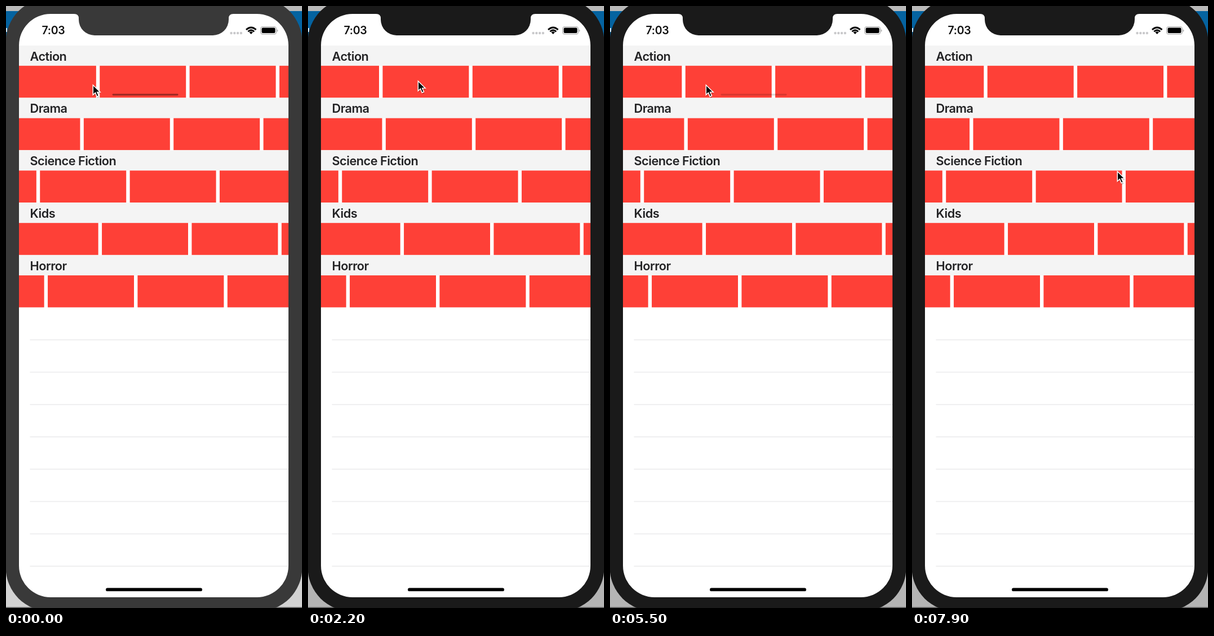
These frames come from a looping animation (525 px wide and 1066 px high, 8000 ms). An HTML page:

```html
<!DOCTYPE html>
<html lang="en">
<head>
<meta charset="utf-8">
<title>Scrolling rows</title>
<style>
  html, body { margin: 0; width: 100%; height: 100%; overflow: hidden; background: #b4b4b4; }
  svg { display: block; width: 525px; height: 1066px; }
  text { font-family: Inter, "Liberation Sans", sans-serif; font-weight: 600; fill: #222224; }
</style>
</head>
<body>
<svg viewBox="0 0 525 1066" xmlns="http://www.w3.org/2000/svg">
  <defs>
    <clipPath id="list"><rect x="23" y="70" width="478" height="470"/></clipPath>
  </defs>
  <rect id="desk" width="525" height="1066"/>
  <rect width="525" height="9" fill="#b9b9b9"/>
  <rect y="9" width="525" height="70" fill="#0563a0"/>
  <rect y="39" width="2" height="7" fill="#d5e4ee"/>
  <rect y="1064.5" width="525" height="1.5" fill="#555"/>
  <rect id="bezel" x="-.5" y="-14" width="526" height="1086" rx="78"/>
  <path fill="#fff" d="M79 14H121Q129 14 129 22V24A28 28 0 0 0 157 52H367A28 28 0 0 0 395 24V22Q395 14 403 14H445A56 56 0 0 1 501 70V991A56 56 0 0 1 445 1047H79A56 56 0 0 1 23 991V70A56 56 0 0 1 79 14Z"/>

  <text x="63.5" y="50" font-size="19.5" letter-spacing="-.3" style="fill:#111">7:03</text>
  <path d="M399.5 48H418" stroke="#c9c9cb" stroke-width="4.4" stroke-linecap="round" stroke-dasharray="0 5.8"/>
  <g fill="none" stroke="#000" stroke-width="2.9">
    <path d="M426 42Q434.7 34 443.5 42"/>
    <path d="M429.3 45.3Q434.7 40.4 440.2 45.3"/>
  </g>
  <path d="M431.4 46.6Q434.7 43.8 438 46.6L434.7 50Z"/>
  <rect x="451.6" y="36.8" width="27.8" height="13" rx="3.6" fill="none" stroke="#aaa" stroke-width="1.2"/>
  <rect x="453.5" y="38.6" width="24" height="9.4" rx="2"/>
  <path d="M480.6 41V46Q482.4 45 482.4 43.5Q482.4 42 480.6 41Z" fill="#aaa"/>

  <g id="rows" clip-path="url(#list)"></g>
  <g id="lines" fill="#ececed"></g>
  <rect x="177" y="1030.5" width="171" height="5.8" rx="2.9"/>

  <g id="cursor">
    <g id="ring" fill="none">
      <circle cy="2" r="27" stroke="#fff" stroke-opacity=".75" stroke-width="3.4"/>
      <circle cy="2" r="27" stroke="#111" stroke-width="1.8"/>
    </g>
    <path d="M1 4V22L5.2 18.2L8.2 25L11.6 23.5L8.6 17H14Z" opacity=".22"/>
    <path d="M.3 2V19.4L4.4 15.6L7.3 22.4L10.5 21L7.6 14.4H13.1Z" stroke="#fff" stroke-width="1.5"/>
  </g>
</svg>
<script>
const LOOP = 8000, LEFT = 23, PITCH = 159.35, GAP = 6.4, ROW = 92.8;
const GLIDE = 400, HOLD = 150, FADE = 250;
const $ = id => document.getElementById(id);

function add(parent, tag, attrs, text) {
  const el = document.createElementNS("http://www.w3.org/2000/svg", tag);
  for (const k in attrs) el.setAttribute(k, attrs[k]);
  if (text) el.textContent = text;
  parent.appendChild(el);
  return el;
}

// One titled row of cards; offset is how far it starts scrolled.
function makeRow([name, offset], i) {
  const g = add($("rows"), "g", { transform: `translate(0 ${70 + i * ROW})` });
  add(g, "rect", { x: LEFT, width: 478, height: 35.8, fill: "#f4f4f4" });
  add(g, "text", { x: 42.5, y: 26.5, "font-size": 21.7, "letter-spacing": -0.5 }, name);
  const cards = add(g, "g", { fill: "#fe4037" });
  for (let k = 0; k < 12; k++)
    add(cards, "rect", { x: LEFT + k * PITCH, y: 35.8, width: PITCH - GAP, height: 56.6 });
  const bar = add(g, "rect", { y: 85.6, width: 117, height: 2.8, rx: 1.4 });
  return { offset, cards, bar };
}

const rows = [
  ["Action", 653.5], ["Drama", 363.2], ["Science Fiction", 440.8], ["Kids", 331], ["Horror", 427]
].map(makeRow);
for (let i = 0; i < 8; i++)
  add($("lines"), "rect", { x: 42.5, y: 590.4 + i * 57.25, width: 458.5, height: 1.6 });

// Each drag moves its row with the pointer; glide is the travel after release.
const drags = [
  { row: 0, from: -500, to: 0, x: 154, y: 138, dx: 0, glide: 0 },
  { row: 0, from: 1350, to: 1800, x: 107, y: 135, dx: 125.5, glide: 0 },
  { row: 0, from: 3300, to: 3950, x: 60, y: 155, dx: 69.3, glide: 0 },
  { row: 0, from: 4450, to: 4800, x: 300, y: 139, dx: -135, glide: -92.3 },
  { row: 1, from: 6000, to: 6930, x: 206, y: 247, dx: 130, glide: 0 }
];
const rests = [[2200, 195, 131], [4100, 122, 158], [5500, 170, 138], [7900, 364, 291]];
const stops = drags
  .flatMap(d => [[d.from, d.x, d.y], [d.to, d.x + d.dx, d.y]])
  .concat(rests)
  .sort((a, b) => a[0] - b[0]);

const clamp = v => Math.max(0, Math.min(1, v));
const smooth = p => p * p * (3 - 2 * p);
const easeOut = p => 1 - (1 - p) ** 3;
const progress = (t, from, to) => clamp((t - from) / (to - from));

function pointerAt(t) {
  const i = Math.min(stops.filter(s => s[0] <= t).length, stops.length - 1);
  const a = stops[i - 1], b = stops[i];
  const p = smooth(progress(t, a[0], b[0]));
  return [a[1] + (b[1] - a[1]) * p, a[2] + (b[2] - a[2]) * p];
}

function drawRow(row, i, t) {
  let offset = row.offset, alpha = 0;
  for (const d of drags) {
    if (d.row !== i || t < d.from) continue;
    offset -= d.dx * smooth(progress(t, d.from, d.to));
    offset -= d.glide * easeOut(progress(t, d.to, d.to + GLIDE));
    const fadeAt = d.to + HOLD + (d.glide ? GLIDE : 0);
    alpha = t > d.from + 50 ? 0.4 * (1 - progress(t, fadeAt, fadeAt + FADE)) : 0;
  }
  row.cards.setAttribute("transform", `translate(${-offset} 0)`);
  row.bar.setAttribute("x", 29 + offset * 0.2442);
  row.bar.setAttribute("opacity", alpha);
}

function draw(t) {
  const active = t >= 400;
  $("bezel").setAttribute("fill", active ? "#1a1a1a" : "#393939");
  $("desk").setAttribute("fill", active ? "#b4b4b4" : "#d2d2d2");
  rows.forEach((row, i) => drawRow(row, i, t));
  $("cursor").setAttribute("transform", `translate(${pointerAt(t)})`);
  const pressed = drags.some(d => t >= d.from && t < d.to);
  $("ring").setAttribute("visibility", pressed ? "visible" : "hidden");
}

// The press at 1350 rests briefly before it moves.
drags[1].from = 1400;

const start = performance.now();
function tick() {
  draw((performance.now() - start) % LOOP);
  requestAnimationFrame(tick);
}
tick();
</script>
</body>
</html>
```
